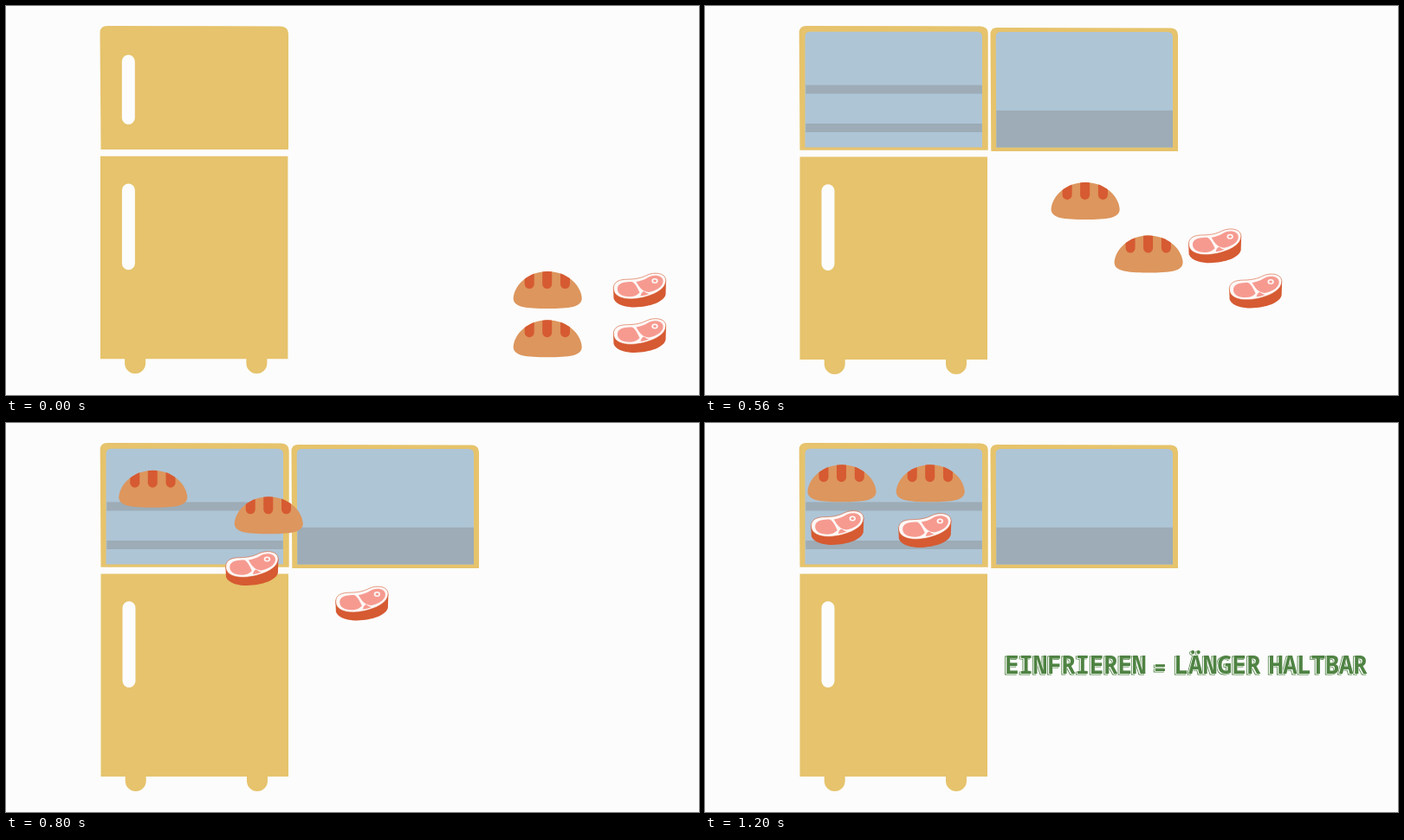
An HTML page for the animation above (2 s loop, 800 px wide and 450 px high).

```html
<!DOCTYPE html>
<html lang="de">
<head>
<meta charset="utf-8">
<title>Einfrieren</title>
<style>
  html, body { margin: 0; width: 100%; height: 100%; overflow: hidden; background: #fcfcfc; }
  svg { display: block; width: 100vw; height: 100vh; }
  svg { --edge: #e6c36c; --ice: #aec5d6; --shelf: #9dacb6; --inside: var(--ice); }
  .body { fill: #e6c36c; }
  .slot { fill: #fcfcfc; }
  .ice { fill: var(--ice); }
  .inside { fill: var(--inside); }
  .shelf { fill: var(--shelf); }
  .edge { fill: var(--edge); }
  .opening { --edge: #f8e6c3; --ice: #d7e1d9; --shelf: #cbd4cc; --inside: #c4c29f; }
  .closed .open, .opened .ghost, .opened .shut, .opening .shut, .opening .racks { display: none; }
  .closed .cabinet { transform: translate(-.6px, -.7px); }
  .crust { fill: #dd965d; }
  .red { fill: #d65a32; }
  .pink { fill: #f69a90; }
  .white { fill: #fdf8f6; }
  #label { font: 700 28px "Noto Sans Mono", "DejaVu Sans Mono", monospace; text-anchor: middle; }
  .line { fill: #fcfcfc; stroke: #4f8343; stroke-width: .8; }
  .face { fill: #4f8343; stroke: #fcfcfc; stroke-width: .8; paint-order: stroke; }
</style>
</head>
<body>
<svg id="stage" class="closed" viewBox="0 0 800 450">
  <defs>
    <path id="dome" d="M-39.5 9C-38-7-21-21.5 0-21.5S38-7 39.5 9C40 20 25 21.5 0 21.5S-40 20-39.5 9Z"/>
    <clipPath id="crustClip"><use href="#dome"/></clipPath>
    <g id="bread">
      <use href="#dome" class="crust"/>
      <g class="red" clip-path="url(#crustClip)">
        <rect x="-26.5" y="-30" width="11" height="28.5" rx="5.5"/>
        <rect x="-6" y="-30" width="11" height="28.5" rx="5.5"/>
        <rect x="14.8" y="-30" width="11" height="28.5" rx="5.5"/>
      </g>
    </g>
    <g id="meat">
      <path class="red" d="M-30.5-3L-30 10C-27 18-14 20-6 20C12 19.5 28 14 30 5L30.5-11Z"/>
      <path class="white" stroke="#d65a32" stroke-width=".6" d="M-30.3-2C-30-10-23-12.3-14-12.3C-4-12.5 2-14 8-17C16-21 30-20.5 30.3-11C30-2 20 4 8 7.5C-8 12.5-30 12-30.3-2Z"/>
      <path class="pink" d="M-25.5-3C-24-9-15-9.5-9-9.5C-5-8-2-1 0 3C-3 6-6 7.5-10 7.7C-19 8.500-27 4.500-25.500-3Z"/>
      <path class="pink" d="M-4-9.500C4-10.500 8-14 13-16C20-18 28-15.500 27-9C26-3 18 1 11 2.500C4 2 1-1-4-9.500Z"/>
      <path class="pink" d="M1 7Q2 2 5 1.500Q8 4 11 4.500Q6 6.500 1 7Z"/>
      <ellipse class="white" cx="17.500" cy="-10.500" rx="3.700" ry="3"/>
      <ellipse class="pink" cx="17.500" cy="-10.500" rx="1.900" ry="1.500"/>
    </g>
    <g id="words">
      <text x="427" y="290" letter-spacing="-.5">EINFRIEREN</text>
      <text x="525" y="291" font-size="24">=</text>
      <text x="591" y="290" letter-spacing="-.1">LÄNGER</text>
      <text x="707" y="290" letter-spacing="-.6">HALTBAR</text>
    </g>
  </defs>

  <g class="cabinet">
    <path class="body" d="M109.500 174.500H326V409H302V414A12 12 0 0 1 278 414V409H161.700V414A12 12 0 0 1 137.700 414V409H109.500Z"/>
    <rect class="slot" x="134.500" y="206.300" width="15" height="99.700" rx="7.500"/>
  </g>

  <g class="shut">
    <path class="body" d="M108.500 31Q108.500 23 117 23L317 23.500Q326 24 326 32V166H109.500Z"/>
    <rect class="slot" x="133.800" y="56.500" width="15" height="80.500" rx="7.500"/>
  </g>

  <g class="open">
    <path class="body" d="M108.700 31Q108.700 23 117 23L318 23.500Q326.700 24 326.700 32V166.700H109.500Z"/>
    <path class="inside" d="M115.500 36Q115.500 29.700 121 29.700H314Q320 29.700 320 36V163.500H115.500Z"/>
    <g class="racks shelf">
      <rect x="116.300" y="91.500" width="203.500" height="10"/>
      <rect x="116.300" y="136" width="203.500" height="10"/>
    </g>
    <g class="ghost">
      <rect class="ice" x="133.800" y="56.500" width="15" height="80.500" rx="7.500"/>
      <rect class="shelf" x="133.800" y="92" width="15" height="9"/>
    </g>
    <path class="edge" d="M329.500 33Q329.500 25 337 25L538 25.500Q546 26 546 34V168H330.300Z"/>
    <path class="ice" d="M335.700 36Q335.700 30 341 30H534Q540 30 540 36V163.500H336.300Z"/>
    <rect class="shelf" x="336.400" y="120.800" width="203.600" height="42.700"/>
  </g>

  <g id="food">
    <use href="#bread"/>
    <use href="#bread"/>
    <use href="#meat"/>
    <use href="#meat"/>
  </g>

  <g id="label" opacity="0">
    <use href="#words" class="line" x="-1.200" y="1"/>
    <use href="#words" class="face" x=".5" y="-.3"/>
  </g>
</svg>
<script>
  const LOOP = 2000, STEP = 40, START = 320;
  const stage = document.getElementById('stage');
  const label = document.getElementById('label');
  const food = [...document.getElementById('food').children];

  // start x, y, end x, y
  const routes = [
    [625.2, 328.5, 158, 69.7],
    [625.2, 384.7, 260.2, 69.7],
    [731.5, 328.5, 152.8, 121],
    [731.5, 381, 253.8, 124]
  ];

  const clamp = v => Math.min(1, Math.max(0, v));
  const ease = s => (1 - Math.cos(Math.PI * s)) / 2;

  function draw(time) {
    const t = Math.floor((time % LOOP) / STEP) * STEP;
    stage.setAttribute('class', t < START ? 'closed' : t < START + STEP ? 'opening' : 'opened');

    // The flight speeds up slightly in its second half
    const flight = t - START + 0.1 * Math.max(0, t - 2 * START);
    routes.forEach(([x0, y0, x1, y1], i) => {
      const p = ease(clamp(flight / (552 + 86.5 * i)));
      food[i].setAttribute('transform', `translate(${x0 + (x1 - x0) * p} ${y0 + (y1 - y0) * p})`);
    });
    label.setAttribute('opacity', clamp((t - 1080) / 120));
  }

  const begin = performance.now();
  function tick() {
    draw(performance.now() - begin);
    requestAnimationFrame(tick);
  }
  tick();
</script>
</body>
</html>
```
